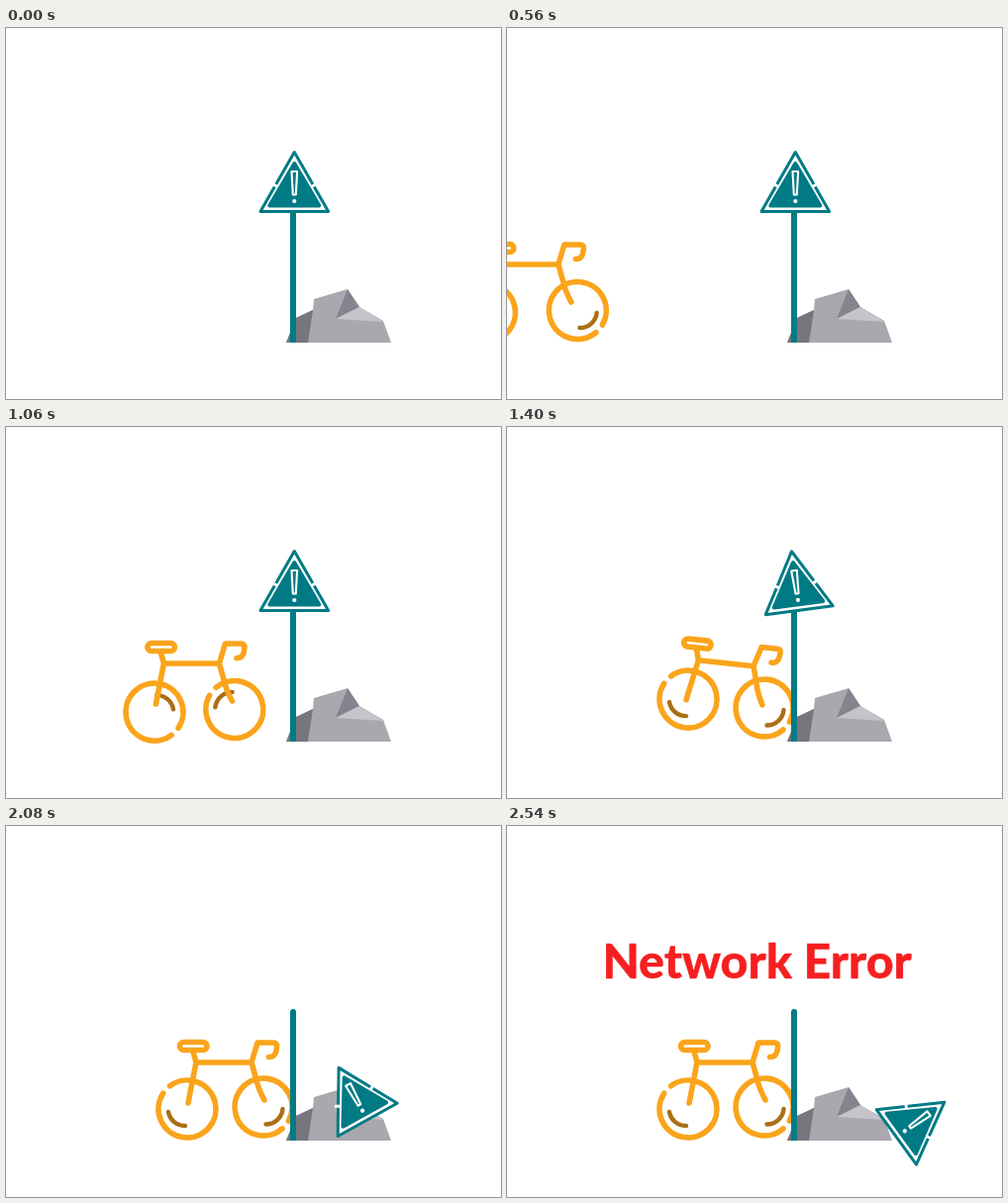
An HTML page that plays this animation: 500 by 375 pixels, repeating every 3.14 s.

```html
<!DOCTYPE html>
<html lang="en">
<head>
<meta charset="utf-8">
<title>Network Error</title>
<style>
  html, body { margin: 0; width: 100%; height: 100%; overflow: hidden; background: #fff; }
  svg { display: block; width: 500px; height: 375px; }
  .line { fill: none; stroke: #faa41b; stroke-width: 5.6; stroke-linecap: round; stroke-linejoin: round; }
  .shine { fill: none; stroke: #aa6f16; stroke-width: 4.4; stroke-linecap: round; }
  text { font: 800 48.3px Lato, sans-serif; fill: #f61f20; stroke: #f61f20; stroke-width: 0.4px; }
</style>
</head>
<body>
<svg viewBox="0 0 500 375">
  <g id="rock">
    <path fill="#a9a8ae" d="M283 318L293 293L310 285L311 274L345 264L357 282L381 296L389 318Z"/>
    <path fill="#77757e" d="M283 318L293 293L310 285L305 318Z"/>
    <path fill="#85838e" d="M345 264L357 282L333 294Z"/>
    <path fill="#c5c4ca" d="M357 282L381 297L333 294Z"/>
  </g>
  <g id="rear">
    <path class="line ring"/>
    <path class="shine" d="M-19 3A17 17 0 0 0 -2 17"/>
  </g>
  <g id="front">
    <path class="line ring"/>
    <path class="shine" d="M19.5 2A17 17 0 0 1 2.5 17.5"/>
  </g>
  <g id="frame" class="line">
    <rect x="175.5" y="218.5" width="27.5" height="8" rx="4"/>
    <path d="M189 228L192 239L184 280M192 239H248M261 277Q255 266 253 257L248 239L254 219H270Q274 219 273.500 223L273 227Q271.500 234 265.500 233.500"/>
  </g>
  <path stroke="#007a85" stroke-width="6" stroke-linecap="round" d="M290 188V315"/>
  <path stroke="#007a85" stroke-width="6" d="M290 300V318"/>
  <g id="sign" stroke-linejoin="round">
    <path fill="#fff" stroke="#007a85" stroke-width="3" d="M0 -29.500L-34.300 30.500H34.300Z"/>
    <path stroke="#fff" stroke-width="3" d="M-22.500 2.500L-17 5.500M22.500 2.500L17 5.500"/>
    <path fill="#007a85" stroke="#007a85" stroke-width="4" d="M0 -18L-25 24.500H25Z"/>
    <path fill="none" stroke="#fff" stroke-width="2.100" d="M-2.800 -10H2.800L1.500 13.500H-1.500Z"/>
    <circle cy="20" r="2.100" fill="#fff"/>
  </g>
  <text id="label" x="96.500" y="153.800">Network Error</text>
</svg>
<script>
const LOOP = 3140;
const $ = id => document.getElementById(id);
const progress = (t, from, to) => Math.min(1, Math.max(0, (t - from) / (to - from)));
const smooth = u => (1 - Math.cos(Math.PI * u)) / 2;
const easeOut = u => 1 - (1 - u) ** 2;
const mix = (a, b, u) => a + (b - a) * u;
const place = (id, x, y, angle, px = 0, py = 0) =>
  $(id).setAttribute('transform',
    `translate(${x} ${y}) rotate(${angle} ${px} ${py})`);

// Open ring with its gap centred on the given direction
function ring(id, gap) {
  const point = deg => {
    const a = deg * Math.PI / 180;
    return `${29 * Math.cos(a)} ${29 * Math.sin(a)}`;
  };
  $(id).querySelector('.ring').setAttribute('d',
    `M${point(gap + 10)}A29 29 0 1 1 ${point(gap - 10)}`);
}
ring('rear', 223);
ring('front', 39);

function drawBike(t) {
  const left = 334 * (1 - smooth(progress(t, -67, 1347)));
  const kick = Math.sin(Math.PI * progress(t, 1320, 1560));
  const spin = -5.5 * left;
  const drop = Math.min(1.5, left / 20);
  place('rear', 183 - left * 1.038, 286 + drop - 12.5 * kick, spin, 0.4, 0.3);
  place('front', 260 - left * 0.962, 284 + drop, spin, 1.1, 0);
  place('frame', -left, 0, 7 * kick, 223, 250);
}

function drawSign(t) {
  const fall = progress(t, 1730, 2080);
  const slide = easeOut(progress(t, 2080, 2420));
  const x = 291.3 + 58.7 * fall + 68 * slide;
  const y = 155 + 115 * fall ** 1.45 + 26.5 * slide;
  let angle = mix(0, -22, smooth(progress(t, 1330, 1510)));
  angle = mix(angle, 28.5, smooth(progress(t, 1510, 1740)));
  angle = mix(angle, -29.5, smooth(progress(t, 1740, 2080)));
  place('sign', x, y, mix(angle, 54, slide));
}

function draw(t) {
  drawBike(t);
  drawSign(t);
  $('label').setAttribute('opacity', progress(t, 2360, 2540));
}

const start = performance.now();
function tick() {
  draw((performance.now() - start) % LOOP);
  requestAnimationFrame(tick);
}
tick();
</script>
</body>
</html>
```
